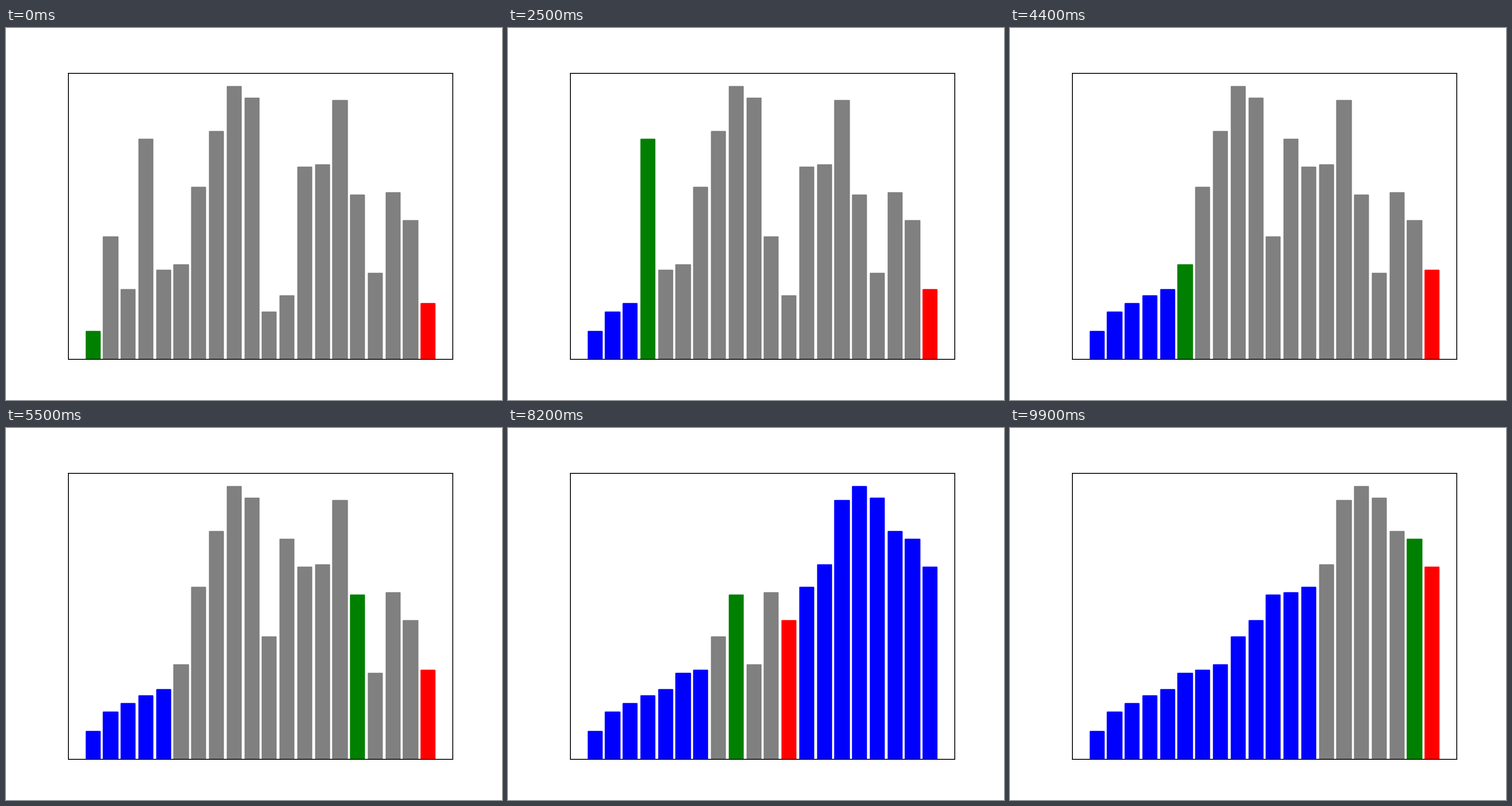
Write a matplotlib script that moves like this. It is 640 px wide and 480 px high and loops after 10000 ms.

```python
from itertools import islice

import matplotlib.pyplot as plt
from matplotlib.animation import FuncAnimation

FRAMES, INTERVAL = 100, 100
VALUES = [10, 44, 25, 79, 32, 34, 62, 82, 98, 94,
          17, 23, 69, 70, 93, 59, 31, 60, 50, 20]


def quicksort(a, low, high):
    """Yield (values, low, high, cursor) for each step of the sort."""
    if low >= high:
        return
    pivot, i = a[high], low
    yield a[:], low, high, low
    for j in range(low, high):
        yield a[:], low, high, j
        if a[j] < pivot:
            if i != j:
                a[i], a[j] = a[j], a[i]
                yield a[:], low, high, j
            i += 1
    a[i], a[high] = a[high], a[i]
    yield a[:], low, high, i
    yield from quicksort(a, low, i - 1)
    yield from quicksort(a, i + 1, high)


def bar_color(k, low, high, cursor):
    if k == high:
        return "red"
    if k == cursor:
        return "green"
    return "gray" if low <= k <= high else "blue"


steps = list(islice(quicksort(VALUES[:], 0, len(VALUES) - 1), FRAMES))

fig, ax = plt.subplots(figsize=(6.4, 4.8), dpi=100)
bars = ax.bar(range(len(VALUES)), VALUES)
ax.set_xticks([])
ax.set_yticks([])


def update(n):
    values, low, high, cursor = steps[n]
    for k, (bar, value) in enumerate(zip(bars, values)):
        bar.set_height(value)
        bar.set_color(bar_color(k, low, high, cursor))
    return list(bars)


anim = FuncAnimation(fig, update, frames=FRAMES, interval=INTERVAL,
                     repeat=True, repeat_delay=0)
plt.show()
```
